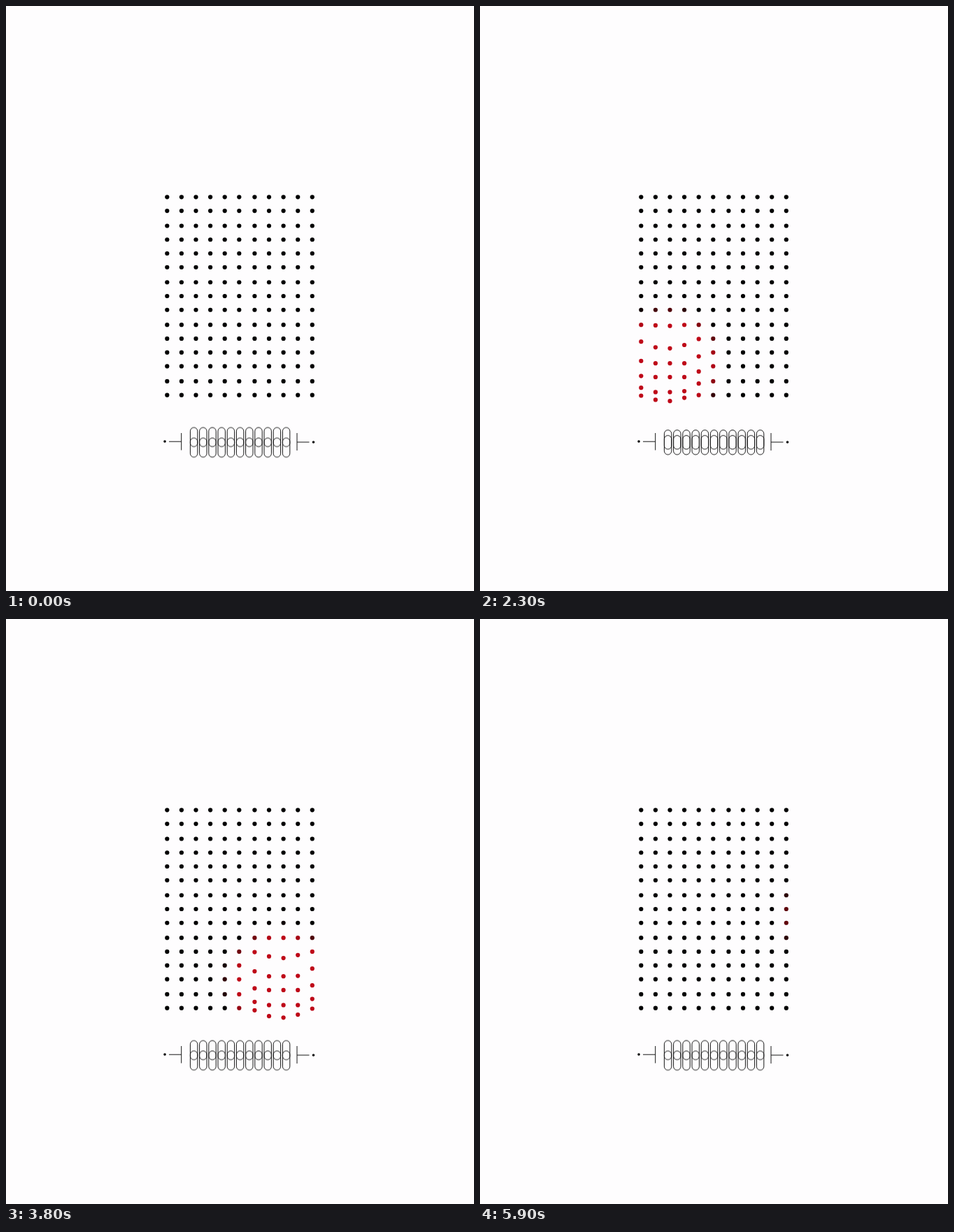
Write an HTML page that moves like this. It is 669 by 837 pixels and loops after 6000 ms.

```html
<!DOCTYPE html>
<html lang="en">
<head>
<meta charset="utf-8">
<title>Dot field</title>
<style>
  html, body { margin: 0; width: 100%; height: 100%; overflow: hidden; background: #fefdfe; }
  svg { display: block; width: 669px; height: 837px; }
  .line { fill: none; stroke: #161616; stroke-width: 1; }
  .pills { animation: slide 2s cubic-bezier(.48, 0, 0, 1) infinite; }
  .up { --shift: -7.5px; }
  .down { --shift: 7.5px; }
  @keyframes slide {
    0%, 100% { transform: translateY(var(--shift)); }
    50% { transform: translateY(0); }
  }
</style>
</head>
<body>
<svg viewBox="0 0 669 837">
  <g id="dots"></g>
  <g class="line">
    <path d="M233 623.2H250.7M250.7 611V635.5M416 611V636M416 624H433.5"/>
    <g class="pills up"></g>
    <g class="pills down"></g>
  </g>
  <circle cx="227" cy="623" r="1.8"/>
  <circle cx="439.5" cy="624" r="1.8"/>
</svg>
<script>
const LOOP = 6000, COLS = 11, ROWS = 15, LIFT = 15.5;

// Turning points of the field's centre: time, x, y
const PATH = [
  [0, 532, 428], [600, 310, 345], [1000, 277, 335.5], [1750, 405, 505],
  [2300, 266.5, 512], [2800, 270, 483], [2900, 286, 374.3], [3200, 345, 316],
  [3800, 393.4, 520], [4500, 289.8, 523], [4900, 285, 440], [5400, 395, 393],
  [5900, 513, 425.7]
];

// Even pitch, with a wider gap at the middle column and every 3.5 rows
const colX = c => 230.3 + 20.6 * c + (c > 5 ? 1.5 : 0);
const rowY = r => 273.3 + 19.75 * r + 1.72 * Math.floor((r + 1.5) / 3.5);

const add = (parent, name, attrs) => {
  const el = document.createElementNS('http://www.w3.org/2000/svg', name);
  for (const k in attrs) el.setAttribute(k, attrs[k]);
  return parent.appendChild(el);
};

const smooth = u => u * u * (3 - 2 * u);
const falloff = (d, inner, outer) =>
  1 - smooth(Math.min(1, Math.max(0, (d - inner) / (outer - inner))));

const key = i => {
  const n = PATH.length, turn = Math.floor(i / n), [t, x, y] = PATH[i - turn * n];
  return [t + turn * LOOP, x, y];
};
const slope = (i, axis) => {
  const a = key(i), b = key(i + 1);
  return (b[axis] - a[axis]) / (b[0] - a[0]);
};
// Monotone tangent, so the route never overshoots a point
const tangent = (i, axis) => {
  const p = slope(i - 1, axis), q = slope(i, axis);
  return p * q > 0 ? 2 * p * q / (p + q) : 0;
};

function centre(t) {
  let i = PATH.length - 1;
  while (PATH[i][0] > t) i--;
  const a = key(i), b = key(i + 1), span = b[0] - a[0], u = (t - a[0]) / span;
  return [1, 2].map(axis =>
    a[axis] + (b[axis] - a[axis]) * smooth(u) + span * u * (1 - u) *
      ((1 - u) * tangent(i, axis) - u * tangent(i + 1, axis)));
}

for (const group of document.querySelectorAll('.pills'))
  for (let i = 0; i < 11; i++)
    add(group, 'rect', { x: 263.4 + i * 13.2, y: 610.6, width: 10.4, height: 27.4, rx: 5.2 });

const dots = [], field = document.getElementById('dots');
for (let r = 0; r < ROWS; r++)
  for (let c = 0; c < COLS; c++) {
    const x = colX(c), y = rowY(r);
    dots.push({ x, y, el: add(field, 'circle', { cx: x, cy: y, r: 3.1 }) });
  }

function draw() {
  const [cx, cy] = centre(performance.now() % LOOP);
  for (const { x, y, el } of dots) {
    const d = Math.hypot(x - cx, y - cy), k = falloff(d, 62, 90);
    el.setAttribute('cy', y + LIFT * falloff(d, 30, 62));
    el.setAttribute('fill', `rgb(${190 * k},${8 * k},${24 * k})`);
  }
  requestAnimationFrame(draw);
}
draw();
</script>
</body>
</html>
```
